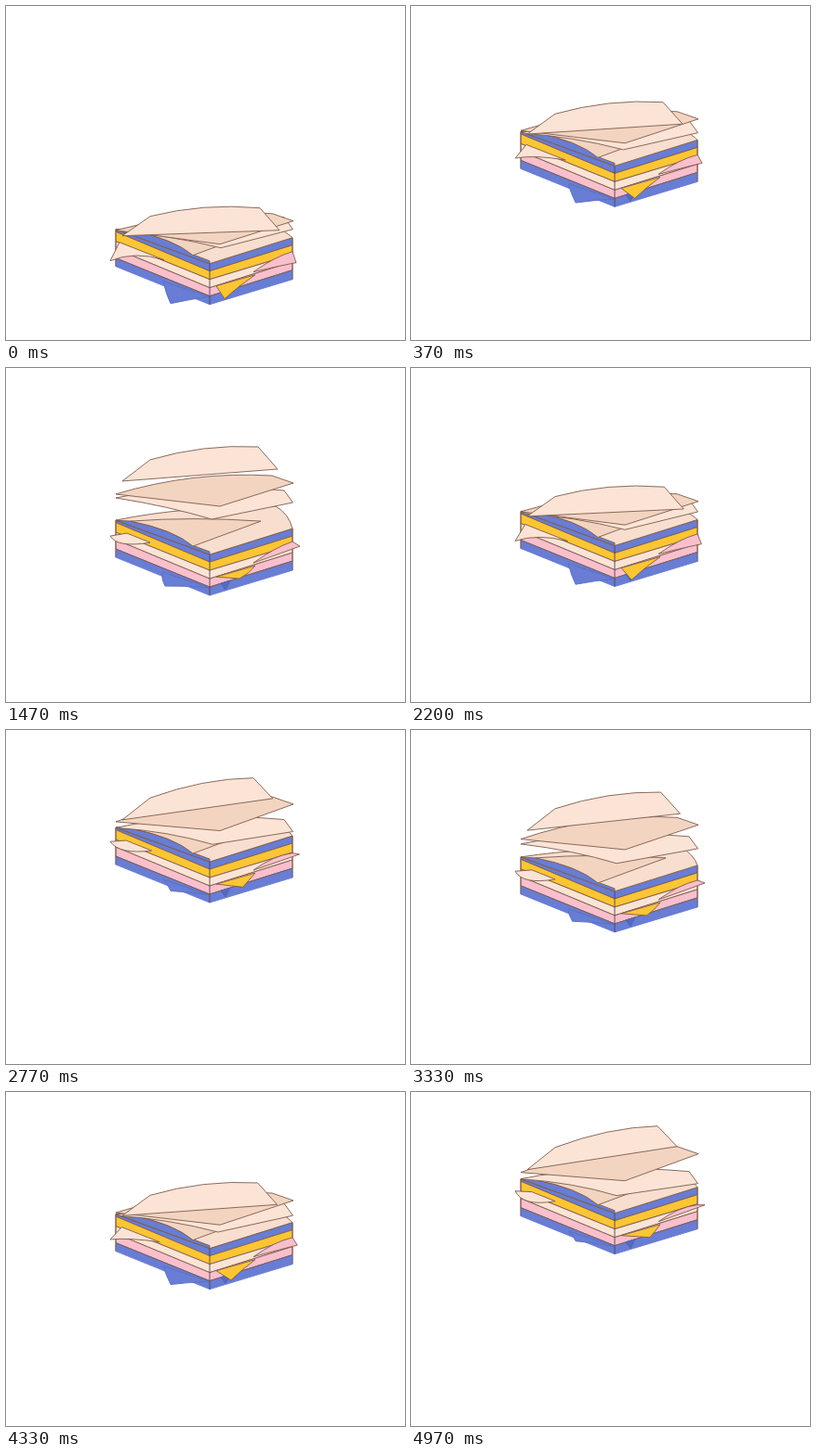
Animation of 429 by 360 pixels, one loop 5 s. Source, as an HTML page:

```html
<!DOCTYPE html>
<html lang="en">
<head>
<meta charset="utf-8">
<title>Bouncing paper stack</title>
<style>
html, body { margin: 0; width: 100%; height: 100%; overflow: hidden; background: #fff; }
svg { display: block; width: 100vw; height: 100vh; }
path { stroke: #7d5c4f; stroke-width: .9; stroke-linejoin: round; }
</style>
</head>
<body>
<svg viewBox="0 0 429 360"><g id="stack"></g></svg>
<script>
const LOOP = 5000, BOUNCE = 1960;
const PEAK = 1050, IMPACT = 1595, SETTLED = 1850;
const BLUE = '#687dd3', YELLOW = '#fcc534', CREAM = '#fbe4d5', SHADE = '#f8dece', TAN = '#f3d4c0', PINK = '#f9bfcc';
const stack = document.getElementById('stack');

function addPath(fill, d = '', stroke = '') {
  const path = document.createElementNS('http://www.w3.org/2000/svg', 'path');
  path.setAttribute('fill', fill);
  path.setAttribute('d', d);
  path.style.stroke = stroke;
  stack.append(path);
  return path;
}

const clamp = x => Math.min(1, Math.max(0, x));
function smooth(from, to, t) {
  const u = clamp((t - from) / (to - from));
  return u * u * (3 - 2 * u);
}

// Monotone cubic through [time, value] keys, flat at turning points.
function curve(keys, t) {
  const last = keys.length - 1;
  t = Math.min(keys[last][0], Math.max(keys[0][0], t));
  let i = 0;
  while (i < last - 1 && t >= keys[i + 1][0]) i++;
  const rate = k => (keys[k + 1][1] - keys[k][1]) / (keys[k + 1][0] - keys[k][0]);
  const slope = k => {
    if (k === 0 || k === last) return 0;
    const a = rate(k - 1), b = rate(k);
    return a * b > 0 ? 2 * a * b / (a + b) : 0;
  };
  const h = keys[i + 1][0] - keys[i][0], u = (t - keys[i][0]) / h, v = 1 - u;
  return v * v * (1 + 2 * u) * keys[i][1] + u * v * v * h * slope(i)
    + u * u * (3 - 2 * u) * keys[i + 1][1] - u * u * v * h * slope(i + 1);
}

// Height of the lowest corner: launch, slow climb, fall, rest.
const bounce = [[60, 321.7], [240, 235.7], [410, 212.7], [800, 186.7],
  [PEAK, 174.7], [1370, 217.7], [1470, 244.7], [IMPACT, 321.7]];

// Block bands; y is measured from the lowest corner.
const left = [-81, -78.5, -68, -60, -50, -41];
const front = [-44, -36, -27, -18, -9, 0];
const right = [-72, -64, -54, -46, -37, -27];
[BLUE, YELLOW, CREAM, PINK, BLUE].forEach((color, i) => {
  const j = i + 1;
  addPath(color, `M118 ${left[i]}L219 ${front[i]}L308 ${right[i]}V${right[j]}L219 ${front[j]}L118 ${left[j]}Z`,
    i === 4 ? BLUE : '');
});
addPath('none', 'M118 -50L219 -9L308 -37M118 -81V-41M308 -72V-27');
addPath('none', 'M219 -44V0', '#54424f');
addPath('#5669bd', 'M231 -13L241 -16L236 -6Z', '#5264b4');

// Shapes depend on a (lift while climbing) and b (spread while falling).
const parts = [];
function part(fill, shape, stroke) {
  parts.push({ path: addPath(fill, '', stroke), shape });
}

// Corners sticking out of the block
part(BLUE, (a, b) => {
  const x = 177 - 6 * b, y = -1 - 13 * a + 4 * b;
  return `M169 -25Q${x - 5} ${y - 10} ${x} ${y}Q198 ${y * .5 - 5} 218 -8.5Z`;
}, '#5870c4');

part(YELLOW, (a, b) =>
  `M226 -20L${235 + 22 * a - 6 * b} ${-6 - 12 * a}Q${250 + 12 * a} ${-20 - 4 * a} 268 -32Z`);

part(PINK, (a, b) =>
  `M266 -35Q288 -51 308 ${-57 + 4 * a - 5 * b}L${312 + 4 * a} ${-45 - 8 * a}Q300 ${-43 - 4 * a} 266 -35Z`);

part(CREAM, (a, b) => {
  const tip = `112 ${-47 - 21 * a + 4 * b}`;
  return `M${tip}L${122 + 8 * a} -67L${170 - 15 * a} ${-48 - 9 * a}Q${138 - 18 * a} ${-58 + 7 * a} ${tip}Z`;
});

// Top face with its curled sheet
part(SHADE, (a, b) => {
  const y = -84 - 2 * a - 10 * b;
  return `M118 -81Q190 ${y} 290 ${y}Q304 ${y + 8} 308 -72L219 -44Z`;
});
addPath(BLUE, 'M118 -81L134 -80Q180 -71 203 -53L219 -47V-44Z');
addPath(TAN, 'M134 -80Q180 -71 201 -53L274 -80Q200 -85 134 -80Z');

// Loose sheets, lowest first
part(CREAM, (a, b) => {
  const x = 231 - 10 * a, y = -61 - 2 * a - 19 * b;
  const side = -79 - 2 * a - 24 * b, tip = -81 + 5 * a - 24 * b;
  return `M118 ${side}Q200 ${tip - 22} 299 ${tip - 13}L308.5 ${tip}L${x} ${y}Q175 ${y - 14} 118 ${side}Z`;
});

part(TAN, (a, b) => {
  const side = -80 - 8 * a - 21 * b, tip = -90 - 18 * a - 13 * b;
  return `M118 ${side}Q200 ${tip - 13} 286 ${tip - 8}L309 ${tip}L230 ${-65 - 14 * a - 17 * b}Z`;
});

part(CREAM, (a, b) => {
  const bend = -95 - 20 * a - 31 * b, back = -104 - 34 * a - 22 * b, x = 273 - 8 * a + 6 * b;
  return `M125 ${-74 - 17 * a - 32 * b}L155 ${bend}Q212 ${(bend + back) / 2 - 10} ${x} ${back}`
    + `L${x + 21} ${-80 - 36 * a - 20 * b}Z`;
});

function draw(time) {
  const t = time % LOOP % BOUNCE;
  const open = 1 - smooth(IMPACT, SETTLED, t);
  const fall = Math.max(0, Math.min(t, IMPACT) - PEAK) / 420;
  const a = smooth(60, 1000, t) * open, b = fall * fall * open;
  stack.setAttribute('transform', `translate(0 ${curve(bounce, t)})`);
  for (const { path, shape } of parts) path.setAttribute('d', shape(a, b));
}

const start = performance.now();
function tick() {
  draw(performance.now() - start);
  requestAnimationFrame(tick);
}
tick();
</script>
</body>
</html>
```
